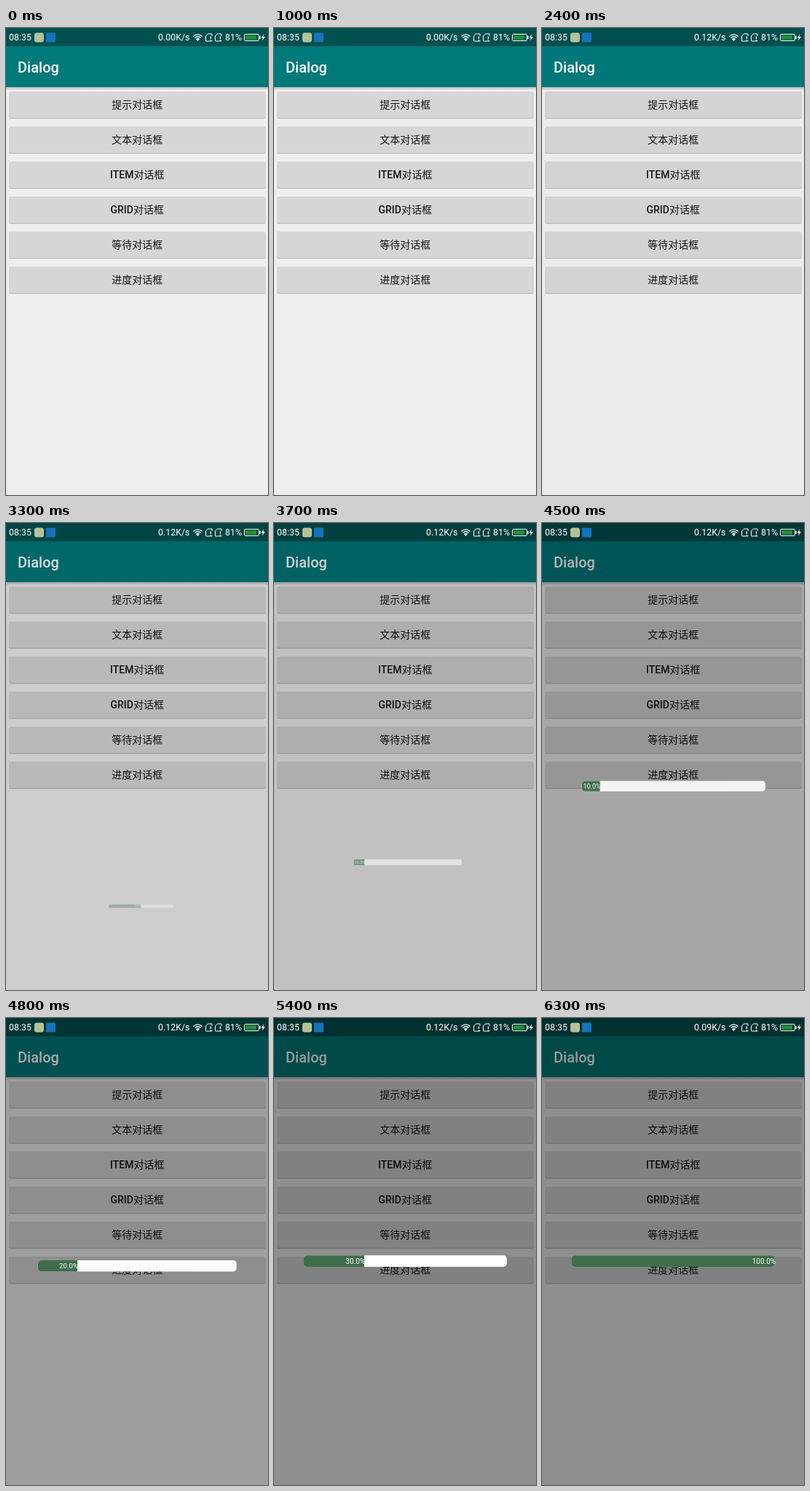
An HTML page for the animation above (6400 ms loop, 360x640 px).

```html
<!DOCTYPE html>
<html lang="zh-CN">
<head>
<meta charset="utf-8">
<title>Dialog</title>
<style>
html, body { margin: 0; width: 100%; height: 100%; overflow: hidden; background: #eee; }
svg { display: block; width: 360px; height: 640px; }
text { font-family: Roboto, "Noto Sans CJK SC", "Noto Sans CJK", sans-serif; }
.title { font-size: 20px; font-weight: 500; fill: #fff; }
.label { font-size: 14px; font-weight: 500; fill: #151515; text-anchor: middle; }
.status text { font-size: 12.4px; fill: #fff; }
.percent { font-size: 10px; fill: #fff; text-anchor: end; }
.line { fill: none; stroke: #fff; }
</style>
</head>
<body>
<svg viewBox="0 0 360 640">
  <defs>
    <linearGradient id="shade" x2="0" y2="1">
      <stop stop-color="#000" stop-opacity=".22"/>
      <stop offset="1" stop-color="#000" stop-opacity="0"/>
    </linearGradient>
    <clipPath id="pill"><rect x="40.3" y="325.2" width="279.6" height="15.8" rx="5"/></clipPath>
    <g id="sim">
      <path class="line" d="M3.5 .5H9V3.5M9 9.5V10.5H1Q.5 10.5 .5 10V3.5L3.5 .5"/>
      <path class="line" stroke-width="1.2" d="M7.4 4V7.4M7.4 8.6V9.8"/>
    </g>
  </defs>

  <rect width="360" height="640" fill="#eee"/>
  <rect y="81" width="360" height="4.5" fill="url(#shade)"/>
  <rect y="25" width="360" height="56" fill="#00797a"/>
  <rect width="360" height="25" fill="#00504f"/>
  <text class="title" x="16" y="61">Dialog</text>
  <g id="buttons"></g>
  <rect id="dim" width="360" height="640" opacity="0"/>

  <g class="status">
    <text x="4" y="17">08:35</text>
    <rect x="39" y="6.5" width="13" height="13" rx="3" fill="#b5c295"/>
    <rect x="55" y="6.5" width="13" height="13" rx="1" fill="#1673b8"/>
    <text id="speed" x="252.5" y="17" text-anchor="end">0.00K/s</text>
    <path class="line" stroke-width="1.3" d="M257.4 11.4Q263.5 6.4 269.6 11.4M259.4 13.5Q263.5 10 267.6 13.5"/>
    <path fill="#fff" d="M260.8 15Q263.5 12.8 266.2 15L263.5 18Z"/>
    <use href="#sim" x="274" y="7.5"/>
    <use href="#sim" x="287" y="7.5"/>
    <text x="301" y="17">81%</text>
    <rect class="line" x="327.5" y="8.5" width="20" height="9" rx="1"/>
    <rect x="329" y="10" width="15" height="6" fill="#1c8f3a"/>
    <rect x="348" y="11" width="1.7" height="4" fill="#fff"/>
    <path fill="#fff" d="M354 8.2L350.7 13.6H353L352 17.8L355.8 12H353.4Z"/>
  </g>

  <g id="dialog" opacity="0">
    <rect x="40.3" y="325.2" width="279.6" height="15.8" rx="5" fill="#fff"/>
    <g clip-path="url(#pill)"><rect id="fill" x="40" y="324" width="0" height="18" fill="#3e6e4a"/></g>
    <text id="percent" class="percent" y="336.8"></text>
  </g>
</svg>
<script>
const LOOP = 6400, STEP = 100;
const PIVOT = [188, 614.5];
const BAR = { x: 40.3, width: 280 };

// [start ms, value]; each value holds until the next entry
const SPEEDS = [[0, '0.00'], [1700, '0.12'], [6100, '0.09']];
const PROGRESS = [
  [0, 50], [3700, 10], [4700, 20], [5400, 30], [5500, 40], [5600, 50],
  [5700, 60], [5800, 70], [5900, 80], [6000, 90], [6200, 100]
];

const $ = id => document.getElementById(id);
const held = (table, t) => table.findLast(([start]) => t >= start)[1];
const ramp = (t, start, length) => Math.min(1, Math.max(0, (t - start) / length));

const labels = ['提示', '文本', 'ITEM', 'GRID', '等待', '进度'];
$('buttons').innerHTML = labels.map((name, i) => {
  const y = 87 + 48 * i;
  const box = (dy, color, alpha) =>
    `<rect x="4" y="${y + dy}" width="352.5" height="36" rx="2" fill="${color}" opacity="${alpha}"/>`;
  return box(1.8, '#000', .1) + box(.9, '#000', .12) + box(0, '#d6d6d6', 1) +
    `<text class="label" x="180.2" y="${y + 23}">${name}对话框</text>`;
}).join('');

function draw(t) {
  // the dialog eases out of its pivot while the page dims evenly
  const scale = .5 - .5 * Math.cos(Math.PI * ramp(t, 2202, 2880));
  const [px, py] = PIVOT;
  $('dialog').setAttribute('transform',
    `translate(${px} ${py}) scale(${scale}) translate(${-px} ${-py})`);
  $('dialog').setAttribute('opacity', t < 2400 ? 0 : scale);
  $('dim').setAttribute('opacity', .4 * ramp(t, 2300, 2950));

  const progress = held(PROGRESS, t);
  const width = BAR.width * progress / 100;
  $('fill').setAttribute('width', width);
  $('percent').setAttribute('x', BAR.x + width + .8);
  $('percent').textContent = progress.toFixed(1) + '%';
  $('speed').textContent = held(SPEEDS, t) + 'K/s';
}

const origin = performance.now();
function tick() {
  const t = (performance.now() - origin) % LOOP;
  draw(Math.floor(t / STEP) * STEP);
  requestAnimationFrame(tick);
}
tick();
</script>
</body>
</html>
```
